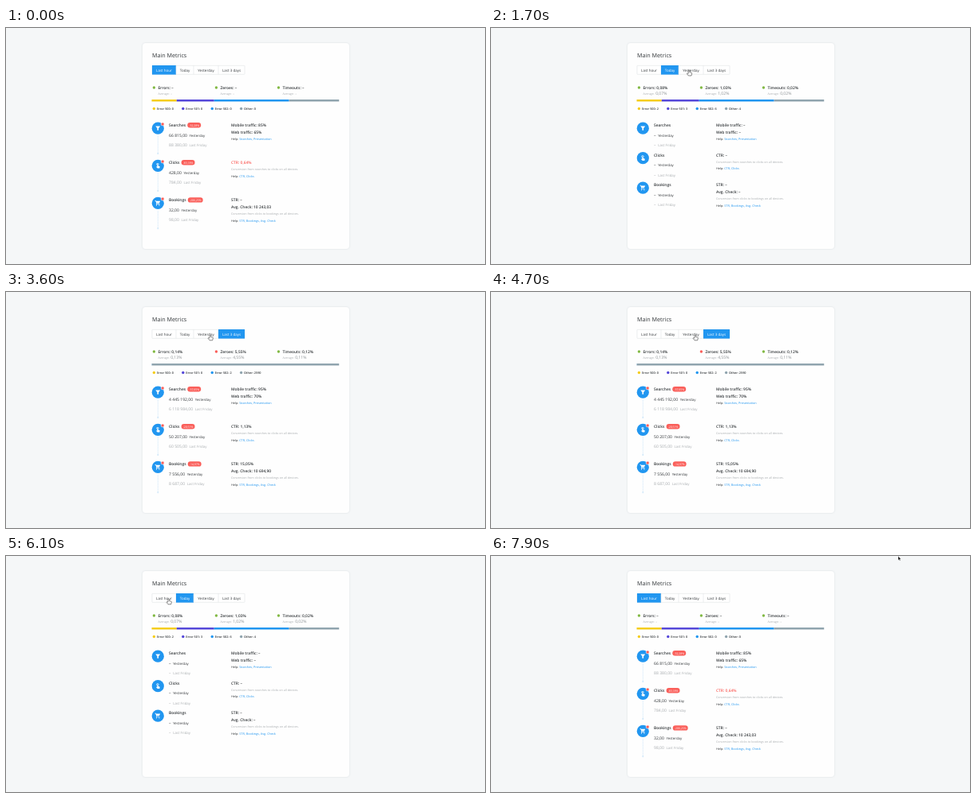
Recreate the animation shown at these times as an HTML page. Size 600 px wide and 297 px high, loop 8 s.

```html
<!DOCTYPE html>
<html lang="en">
<head>
<meta charset="utf-8">
<title>Main Metrics</title>
<style>
  html, body { margin: 0; width: 100%; height: 100%; overflow: hidden; background: #f5f7f8; }
  svg { display: block; width: 100%; height: 100%; }
  text { font-family: "Open Sans", "Noto Sans", sans-serif; fill: #33373a; text-rendering: geometricPrecision; white-space: pre; }
  .title { font-size: 7.2px; }
  .tab { font-size: 4.5px; text-anchor: middle; }
  .strong { font-size: 4.9px; font-weight: 600; }
  .value { font-size: 5.1px; }
  .day { font-size: 4.35px; }
  .legend { font-size: 3.8px; font-weight: 600; }
  .help { font-size: 3.8px; }
  .note { font-size: 3.7px; }
  .avg { font-size: 3.6px; }
  .badge { font-size: 3.5px; }
  .card { filter: drop-shadow(0 .5px 1px rgba(60, 80, 95, .14)); }
</style>
</head>
<body>
<svg id="stage" viewBox="0 0 600 297" preserveAspectRatio="none">
  <rect class="card" x="171" y="19" width="259" height="259" rx="4" fill="#fefefe"/>
  <text class="title" x="183" y="37.3">Main Metrics</text>
</svg>
<script>
const LOOP = 8000, STEP = 100;
const BLUE = '#2196f0', GREEN = '#82b944', RED = '#fa5f5a', GRAY = '#90a4ae';
const YELLOW = '#f5cd1e', PURPLE = '#5548d9', PALE = '#a9adb0', WHITE = '#fff';

const stage = document.getElementById('stage');

function add(parent, tag, attrs = {}, content) {
  const node = document.createElementNS('http://www.w3.org/2000/svg', tag);
  for (const key in attrs) node.setAttribute(key, attrs[key]);
  if (content !== undefined) node.textContent = content;
  parent.append(node);
  return node;
}

// Text centred on y; extra parts continue the line as [text, class, colour, gap].
function label(parent, x, y, cls, content, color, ...parts) {
  const node = add(parent, 'text', { x, y: y + 1.8, class: cls }, content);
  if (color) node.style.fill = color;
  for (const [words, partClass, fill, dx = 0] of parts) {
    const span = add(node, 'tspan', { class: partClass, dx }, words);
    if (fill) span.style.fill = fill;
  }
  return node;
}

const dot = (parent, cx, cy, r, fill, more) => add(parent, 'circle', { cx, cy, r, fill, ...more });

const TABS = [['Last hour', 183, 213], ['Today', 213, 235], ['Yesterday', 235, 266], ['Last 3 days', 266, 299]];
const CONVERSION = (from, to) => `Conversion from ${from} to ${to} on all devices.`;

const STATES = [
  {
    health: [['–', '–'], ['–', '–'], ['–', '–']],
    errors: [0, 0, 0, 0], shares: [2, 3, 6, 4],
    rows: [['66 815,00', '88 380,00', '-32,28%'], ['428,00', '784,00', '-83,18%'], ['32,00', '98,00', '-206,25%']],
    traffic: ['85%', '65%'], ctr: '0,64%', ctrColor: RED, str: '–', check: '10 243,03'
  },
  {
    health: [['0,08%', '0,07%'], ['1,03%', '1,02%'], ['0,02%', '0,02%']],
    errors: [2, 3, 6, 4], shares: [2, 3, 6, 4], compact: true,
    rows: [['–', '–'], ['–', '–'], ['–', '–']],
    traffic: ['–', '–'], ctr: '–', str: '–', check: '–'
  },
  {
    health: [['0,38%', '0,28%'], ['5,03%', '4,03%', RED], ['0,22%', '0,12%']],
    errors: [0, 0, 0, 920], shares: [0, 0, 0, 1],
    rows: [['2 188 541,00', '2 050 500,00', '+6,31%'], ['23 210,00', '23 364,00', '-0,66%'], ['3 465,00', '3 641,00', '-5,08%']],
    traffic: ['100%', '100%'], trafficNote: 'You get 100% traffic on mobile and desktop devices.',
    ctr: '1,06%', str: '14,93%', check: '9 447,87'
  },
  {
    health: [['0,14%', '0,13%'], ['5,55%', '4,55%', RED], ['0,12%', '0,11%']],
    errors: [0, 0, 2, 2590], shares: [0, 0, 2, 2590],
    rows: [['4 445 192,00', '6 118 984,00', '-37,65%'], ['50 207,00', '60 505,00', '-20,51%'], ['7 556,00', '8 687,00', '-14,97%']],
    traffic: ['95%', '70%'], ctr: '1,13%', str: '15,05%', check: '10 694,90'
  }
];

const ICONS = [
  'M3 4H21L14.5 12.5V20H9.5V12.5Z',
  'M9 11V6.5a2 2 0 0 1 4 0V12l5.5 2.3q1 .5 .8 1.6L18.4 22H10.5L5 16.4l1-1 3 .8ZM6.5 9a5 5 0 1 1 9 0l-1.2-.8a3.5 3.5 0 1 0-6.6 0Z',
  'M1 2H4.3L5.3 4H21L16.8 12.4H8L7.2 15H19V17H5L6.3 12 3 4H1ZM5 20a2 2 0 1 0 4 0 2 2 0 1 0-4 0ZM15 20a2 2 0 1 0 4 0 2 2 0 1 0-4 0Z'
];

function drawTabs(g, active) {
  add(g, 'rect', { x: 183, y: 47.3, width: 116, height: 11, rx: .6, fill: WHITE, stroke: '#dfe3e5', 'stroke-width': .6 });
  TABS.forEach(([name, left, right], i) => {
    if (i) add(g, 'path', { d: `M${left} 47.3v11`, stroke: '#dfe3e5', 'stroke-width': .6 });
    if (i === active) add(g, 'rect', { x: left, y: 47, width: right - left, height: 11.6, fill: BLUE });
    label(g, (left + right) / 2, 52.7, 'tab', name, i === active ? WHITE : '');
  });
}

function drawHealth(g, { health, errors, shares }) {
  ['Errors', 'Zeroes', 'Timeouts'].forEach((name, i) => {
    const x = 185.4 + 78 * i, [now, average, color = GREEN] = health[i];
    dot(g, x, 75, 1.7, color);
    label(g, x + 5, 75, 'strong', `${name}: ${now}`);
    label(g, x + 5, 81.7, 'avg', 'Average: ', PALE, [average, average === '–' ? 'avg' : 'value', '#8d9295', .4]);
  });

  const colors = [YELLOW, PURPLE, BLUE, GRAY];
  const total = shares.reduce((sum, n) => sum + n);
  let x = 182.5;
  shares.forEach((share, i) => {
    const width = 234.7 * share / total;
    add(g, 'rect', { x, y: 90, width, height: 2.5, fill: colors[i] });
    x += width;
  });

  ['Error 500', 'Error 501', 'Error 502', 'Other'].forEach((name, i) => {
    const left = 185.4 + 36.4 * i;
    dot(g, left, 101.5, 1.7, colors[i]);
    label(g, left + 3.5, 101.2, 'legend', `${name}: ${errors[i]}`);
  });
}

function drawRow(g, name, i, y, [now, before, change]) {
  dot(g, 190.3, y, 7.6, BLUE);
  add(g, 'path', { d: ICONS[i], fill: WHITE, transform: `translate(186.3 ${y - 4}) scale(.33)` });
  const head = label(g, 204, y - 4, 'strong', name);
  label(g, 204, y + 8.5, 'value', now, '', ['Yesterday', 'day', '', 2.6]);
  label(g, 204, y + 21, 'value', before, PALE, ['Last Friday', 'day', PALE, 2.6]);
  if (!change) return;

  const color = change[0] === '+' ? GREEN : RED;
  dot(g, 196.2, y - 5.3, 2, color, { stroke: WHITE, 'stroke-width': .6 });
  add(g, 'path', { d: `M190.3 ${y + 9.5}v22`, stroke: '#bfdff8', 'stroke-width': .8, 'stroke-dasharray': '1 1' });
  dot(g, 190.3, y + 31.8, 1, '#cfe6f9');

  const x = 204 + head.getComputedTextLength() + 2.2;
  const pill = add(g, 'rect', { x, y: y - 7.2, height: 6.4, rx: 3.2, fill: color });
  const text = label(g, x + 2, y - 4.5, 'badge', change, WHITE);
  pill.setAttribute('width', text.getComputedTextLength() + 4);
}

function drawDetails(g, y, facts, note, links, color) {
  let line = y - 4;
  for (const fact of facts) {
    label(g, 282, line, 'strong', fact, color);
    line += 8.8;
  }
  line -= .2;
  if (note) {
    label(g, 282, line - .3, 'note', note, PALE);
    line += 8.5;
  }
  label(g, 282, line - .4, 'help', 'Help: ', '', [links, 'help', BLUE]);
}

const views = STATES.map((state, active) => {
  const g = add(stage, 'g');
  drawTabs(g, active);
  drawHealth(g, state);
  const rowY = i => 126.2 + i * (state.compact ? 37.5 : 47.1);
  ['Searches', 'Clicks', 'Bookings'].forEach((name, i) => drawRow(g, name, i, rowY(i), state.rows[i]));
  const [mobile, web] = state.traffic;
  drawDetails(g, rowY(0), [`Mobile traffic: ${mobile}`, `Web traffic: ${web}`], state.trafficNote, 'Searches, Presentation');
  drawDetails(g, rowY(1), [`CTR: ${state.ctr}`], CONVERSION('searches', 'clicks'), 'CTR, Clicks', state.ctrColor);
  drawDetails(g, rowY(2), [`STR: ${state.str}`, `Avg. Check: ${state.check}`], CONVERSION('clicks', 'bookings'), 'STR, Bookings, Avg. Check');
  return g;
});

// Cursor shapes have their hot spot at 0,0.
const hand = add(stage, 'path', {
  d: 'M-.8 .7Q0-.5 .8 .7V2.7L3 3.2Q3.8 3.4 3.6 4.3L3 7H-.7L-2.6 4.5Q-2.6 3.4-.8 4.3Z',
  fill: WHITE, stroke: '#3a3a3a', 'stroke-width': .6, 'stroke-linejoin': 'round'
});
const arrow = add(stage, 'path', {
  d: 'M0 0V5L1.2 4 2 5.8 2.8 5.4 2 3.7H3.5Z', fill: '#111', stroke: WHITE, 'stroke-width': .3
});

const SWITCHES = [[0, 0], [1300, 1], [2000, 2], [3200, 3], [4800, 2], [5500, 1], [6200, 0]];
const PATH = [
  [400, 405, 112], [900, 226, 54], [1300, 226, 54], [1700, 248, 53], [2000, 248, 53], [2400, 281.5, 53.8],
  [3200, 281.5, 53.8], [3600, 255.7, 53.8], [4800, 255.7, 53.8], [5200, 227, 54], [5500, 227, 54],
  [5900, 203.7, 53.8], [7100, 203.7, 53.8], [7900, 510, .2]
];

function cursorAt(t) {
  const next = PATH.findIndex(key => key[0] > t);
  if (next === 0) return null;
  if (next < 0) return PATH[PATH.length - 1].slice(1);
  const [t0, x0, y0] = PATH[next - 1], [t1, x1, y1] = PATH[next];
  const p = (t - t0) / (t1 - t0), k = p * p * (3 - 2 * p);
  return [x0 + (x1 - x0) * k, y0 + (y1 - y0) * k];
}

const show = (node, on) => node.style.display = on ? '' : 'none';

function render(time) {
  const t = Math.floor(time % LOOP / STEP) * STEP;
  const active = SWITCHES.filter(([at]) => at <= t).pop()[1];
  views.forEach((view, i) => show(view, i === active));

  const spot = cursorAt(t);
  const overTabs = spot && spot[0] > 183 && spot[0] < 299 && spot[1] > 47 && spot[1] < 58.6;
  show(hand, overTabs);
  show(arrow, spot && !overTabs);
  if (spot) (overTabs ? hand : arrow).setAttribute('transform', `translate(${spot})`);
}

const start = performance.now();
function tick() {
  render(performance.now() - start);
  requestAnimationFrame(tick);
}
tick();
</script>
</body>
</html>
```
